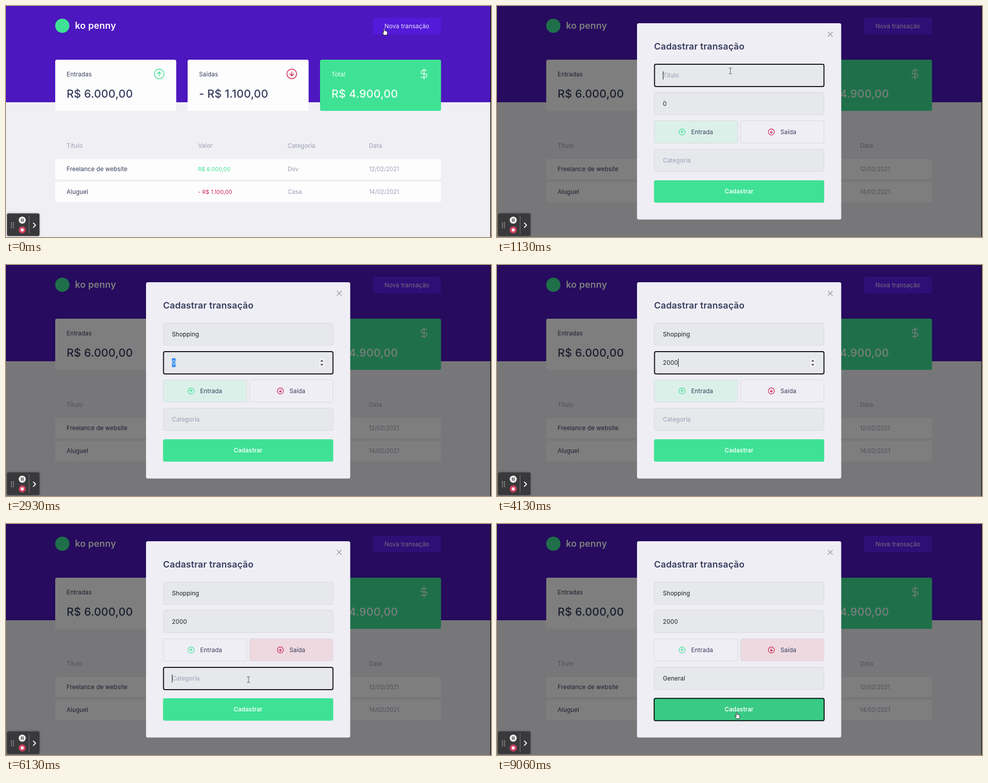
An HTML page with a canvas that plays this animation: 956 px wide and 456 px high, repeating every 9.33 s.

```html
<!DOCTYPE html>
<html lang="pt-BR">
<head>
<meta charset="utf-8">
<title>Nova transação</title>
<style>
  html, body { margin: 0; width: 100%; height: 100%; overflow: hidden; background: #f0eff4; }
  canvas { display: block; }
</style>
</head>
<body>
<canvas id="stage" width="956" height="456"></canvas>
<script>
const c = document.getElementById('stage').getContext('2d');
const LOOP = 9330;
const MODAL_AT = 260, RING_MS = 265;
const BODY = 11.7, MONEY = 10.8;

const color = {
  header: '#4c17be', button: '#5c1fee', buttonHover: '#531ad9',
  page: '#f0eff4', card: '#fdfdfe', green: '#3fe295', greenHover: '#39cb86',
  red: '#cb1f4f', title: '#363c5c', muted: '#9a9fb3', ink: '#1d1d22',
  modal: '#f0eef5', input: '#e6e8ec', border: '#d6d9df',
  entryTint: '#dcf0ea', exitTint: '#eed9e0'
};

const clicks = [
  { t: 200, x: 746.5, y: 48 },
  { t: 860, x: 460, y: 128 },
  { t: 5190, x: 524, y: 253 },
  { t: 5860, x: 478, y: 307 },
  { t: 8800, x: 473.5, y: 375 }
];

// Each move starts where the previous one ended.
const moves = [
  { from: 330, to: 800, x: 460, y: 128 },
  { from: 4700, to: 5130, x: 524, y: 253 },
  { from: 5400, to: 5660, x: 478, y: 307 },
  { from: 8400, to: 8730, x: 473.5, y: 375 }
];

const fields = [
  { y: 114.5, hint: 'Título', text: 'Shopping', focus: 930, blur: 2930,
    keys: [1600, 1860, 1930, 2130, 2260, 2460, 2660, 2730] },
  { y: 170.5, text: '2000', initial: '0', number: true, focus: 2930, blur: 5190,
    keys: [3260, 3460, 3560, 3660] },
  { y: 282.5, hint: 'Categoria', text: 'General', focus: 5930, blur: 8800,
    keys: [7200, 7260, 7330, 7400, 7460, 7530, 7660] }
];

const within = (t, a, b) => t >= a && t < b;
const ease = p => p * p * (3 - 2 * p);

function box(x, y, w, h, r, fill, stroke, line = 1) {
  c.beginPath();
  c.roundRect(x, y, w, h, r);
  if (fill) { c.fillStyle = fill; c.fill(); }
  if (stroke) { c.strokeStyle = stroke; c.lineWidth = line; c.stroke(); }
}

function disc(x, y, r, fill) {
  c.beginPath();
  c.arc(x, y, r, 0, 7);
  c.fillStyle = fill;
  c.fill();
}

function lines(stroke, width, ...paths) {
  c.strokeStyle = stroke;
  c.lineWidth = width;
  c.lineCap = c.lineJoin = 'round';
  c.beginPath();
  for (const p of paths)
    p.forEach(([x, y], i) => i ? c.lineTo(x, y) : c.moveTo(x, y));
  c.stroke();
}

function polygon(points, fill, stroke) {
  c.beginPath();
  points.forEach(([x, y]) => c.lineTo(x, y));
  c.closePath();
  c.lineJoin = 'round';
  c.fillStyle = fill;
  c.fill();
  if (stroke) { c.strokeStyle = stroke; c.lineWidth = 1; c.stroke(); }
}

function text(str, x, y, fill, size = BODY, weight = 400, align = 'left') {
  c.font = `${weight} ${size}px Inter, "Open Sans", sans-serif`;
  c.letterSpacing = size * 0.01 + 'px';
  c.textAlign = align;
  c.fillStyle = fill;
  c.fillText(str, x, y);
  return c.measureText(str).width;
}

function arrowIcon(x, y, r, dir, stroke, width) {
  c.beginPath();
  c.arc(x, y, r, 0, 7);
  c.strokeStyle = stroke;
  c.lineWidth = width;
  c.stroke();
  const a = r * 0.42, tip = y + dir * a;
  lines(stroke, width, [[x, y - dir * a], [x, tip]], [[x - a, y], [x, tip], [x + a, y]]);
}

function dollarIcon(x, y, stroke) {
  lines(stroke, 1.4, [[x, y - 10.5], [x, y + 10.5]]);
  c.beginPath();
  c.moveTo(x + 5, y - 6.7);
  c.lineTo(x - 2.3, y - 6.7);
  c.arc(x - 2.3, y - 3.35, 3.35, -Math.PI / 2, Math.PI / 2, true);
  c.lineTo(x + 2.3, y);
  c.arc(x + 2.3, y + 3.35, 3.35, -Math.PI / 2, Math.PI / 2);
  c.lineTo(x - 6, y + 6.7);
  c.stroke();
}

function card(x, label, amount, fill, ink) {
  box(x, 106, 238.5, 101, 3.5, fill);
  text(label, x + 22.5, 138.5, ink);
  text(amount, x + 22.5, 181, ink, 21.7, 500);
}

function row(y, name, value, valueColor, category, date) {
  box(97, y, 760.5, 40, 3.5, color.card);
  const base = y + 23.8;
  text(name, 119.5, base, color.title);
  text(value, 378.5, base, valueColor, MONEY);
  text(category, 555, base, color.muted);
  text(date, 715.5, base, color.muted, 11.1);
}

function drawPage(t) {
  c.fillStyle = color.page;
  c.fillRect(0, 0, 956, 456);
  c.fillStyle = color.header;
  c.fillRect(0, 0, 956, 190);

  disc(111, 39, 14, color.green);
  text('ko penny', 136, 45, '#fff', 18, 600);
  box(723, 23, 134.5, 33, 3.5, t < 400 ? color.buttonHover : color.button);
  text('Nova transação', 790.3, 43.7, '#e9e2fb', BODY, 400, 'center');

  card(97, 'Entradas', 'R$ 6.000,00', color.card, color.title);
  card(358, 'Saídas', '- R$ 1.100,00', color.card, color.title);
  card(619, 'Total', 'R$ 4.900,00', color.green, '#f4fff9');
  arrowIcon(302, 134, 9.5, -1, color.green, 1.5);
  arrowIcon(563.3, 134, 9.5, 1, color.red, 1.5);
  dollarIcon(824, 134, '#f4fff9');

  text('Título', 119.5, 280.3, color.muted);
  text('Valor', 378.5, 280.3, color.muted);
  text('Categoria', 555, 280.3, color.muted);
  text('Data', 715.5, 280.3, color.muted);
  row(302, 'Freelance de website', 'R$ 6.000,00', color.green, 'Dev', '12/02/2021');
  row(347, 'Aluguel', '- R$ 1.100,00', color.red, 'Casa', '14/02/2021');
}

function focusRing(x, y, w) {
  box(x, y, w, 44, 3, null, '#131318', 2);
}

function drawField(f, t) {
  const focused = within(t, f.focus, f.blur);
  const base = f.y + 26.7;
  const typed = f.keys.filter(k => t >= k).length;
  const value = f.text.slice(0, typed) || f.initial || '';
  box(310, f.y, 334.5, 44, 3.5, color.input, color.border);

  const selected = f.number && focused && !typed;
  if (selected) {
    c.fillStyle = '#398cf2';
    c.fillRect(327, f.y + 13.5, 7.3, 17.5);
  }
  const ink = selected ? '#e8f1fd' : value ? color.ink : color.muted;
  const width = text(value || f.hint, 327, base, ink);

  if (!focused) return;
  focusRing(310.5, f.y + 0.5, 334);
  if (f.number) {
    box(617, f.y + 14, 11, 17, 1, '#f1f1f3');
    const mid = f.y + 22.5;
    polygon([[619.5, mid - 2.5], [622.5, mid - 6], [625.5, mid - 2.5]], '#444');
    polygon([[619.5, mid + 2.5], [622.5, mid + 6], [625.5, mid + 2.5]], '#444');
  }
  const since = t - (typed ? f.keys[typed - 1] : f.focus);
  if (!selected && since % 1020 < 510) {
    c.fillStyle = '#111';
    c.fillRect(Math.round(327 + (value ? width : 0)), f.y + 14.5, 1, 16);
  }
}

function typeButton(x, label, dir, stroke, fill) {
  box(x, 226.5, 164.5, 44, 3.5, fill, color.border);
  arrowIcon(x + (dir < 0 ? 54.8 : 60.8), 248.7, 6, dir, stroke, 1.2);
  text(label, x + (dir < 0 ? 72.7 : 78.7), 253.2, color.title);
}

function drawModal(t) {
  c.fillStyle = 'rgba(0,0,0,.5)';
  c.fillRect(0, 0, 956, 456);
  if (t < 930) box(274.8, 32.8, 404.4, 389.6, 2, '#fff');
  box(276, 34, 402.5, 387.5, 3.5, color.modal);
  if (t < 930) box(276, 34, 402, 387, 2, null, '#111', 1.6);
  if (t >= 330)
    lines('#9a9aa6', 1.3, [[652.5, 51.5], [661.2, 60.2]], [[661.2, 51.5], [652.5, 60.2]]);

  text('Cadastrar transação', 309.5, 86, color.title, 17.8, 600);
  fields.forEach(f => drawField(f, t));

  const exit = t >= 5330;
  typeButton(310, 'Entrada', -1, color.green, exit ? color.modal : color.entryTint);
  typeButton(480, 'Saída', 1, color.red, exit ? color.exitTint : color.modal);
  if (within(t, 5190, 5930)) focusRing(480.5, 226.8, 164);

  box(309.5, 344, 335.5, 44.3, 3.5, t >= 8600 ? color.greenHover : color.green);
  text('Cadastrar', 477.2, 370.3, '#f3fff9', BODY, 600, 'center');
  if (t >= 8800) box(309.8, 344.3, 335, 44, 3, null, '#0b1512', 2);
}

function drawRecorder() {
  c.save();
  c.shadowColor = 'rgba(0,0,0,.35)';
  c.shadowBlur = 4;
  box(2, 409.5, 64, 44.5, 3, '#39393b');
  c.restore();
  for (let i = 0; i < 8; i++)
    disc(10.7 + (i % 2) * 4, 428 + (i >> 1) * 3.2, 0.9, '#c9c9cb');
  disc(32, 422.7, 7, '#f3f3f3');
  c.fillStyle = '#333';
  c.fillRect(29.6, 419.5, 1.6, 6.4);
  c.fillRect(32.8, 419.5, 1.6, 6.4);
  disc(32, 442, 7, '#d0405f');
  box(29.3, 439.3, 5.4, 5.4, 0.5, '#fff');
  lines('#77777a', 1, [[45.5, 414], [45.5, 450]]);
  lines('#fff', 1.8, [[54, 428.5], [58.3, 432.7], [54, 437]]);
}

function pointerAt(t) {
  let { x, y } = clicks[0];
  for (const m of moves) {
    if (t < m.from) break;
    const p = ease(Math.min(1, (t - m.from) / (m.to - m.from)));
    x += (m.x - x) * p;
    y += (m.y - y) * p;
  }
  return { x, y };
}

function pointerKind(x, y, t) {
  if (t < 345) return 'hand';
  if (!within(x, 310, 645)) return 'arrow';
  if (fields.some(f => within(y, f.y, f.y + 44))) return 'beam';
  return within(y, 226, 271) || within(y, 344, 388) ? 'hand' : 'arrow';
}

const shapes = {
  beam() {
    lines('#55555c', 1, [[-2.5, -5.5], [0, -5], [2.5, -5.5]],
      [[0, -5], [0, 5.5]], [[-2.5, 6], [0, 5.5], [2.5, 6]]);
  },
  hand() {
    polygon([[-2.3, -2.5], [-1.2, -3.5], [0, -2.5], [0.1, 1], [1.7, 0.8], [2.2, 1.6],
      [3.6, 1.5], [4.1, 2.4], [5.2, 2.6], [5.5, 4], [4.8, 7.2], [4, 9.5], [-1.5, 9.5],
      [-4.4, 5], [-4.6, 3.8], [-3.6, 3.5], [-2.3, 4.8]], '#fff', '#26262b');
  },
  arrow() {
    polygon([[0, 0], [0, 11.5], [2.7, 9], [4.6, 13], [6.3, 12.2], [4.5, 8.4], [8, 8.2]],
      '#111', '#fff');
  }
};

function drawPointer(t) {
  for (const k of clicks) {
    const age = t - k.t;
    if (!within(age, 0, RING_MS)) continue;
    c.beginPath();
    c.arc(k.x, k.y, 22.5, 0, 7);
    c.strokeStyle = `rgba(222,20,50,${0.77 * Math.min(1, (RING_MS - age) / 130)})`;
    c.lineWidth = 2.8;
    c.stroke();
  }
  if (within(t, 1600, 4700)) return;
  const { x, y } = pointerAt(t);
  c.save();
  c.translate(x, y);
  shapes[pointerKind(x, y, t)]();
  c.restore();
}

function draw() {
  const t = performance.now() % LOOP;
  drawPage(t);
  if (t >= MODAL_AT) drawModal(t);
  drawRecorder();
  c.fillStyle = '#17151c';
  c.fillRect(954.7, 0, 1.3, 456);
  drawPointer(t);
  requestAnimationFrame(draw);
}
requestAnimationFrame(draw);
</script>
</body>
</html>
```
